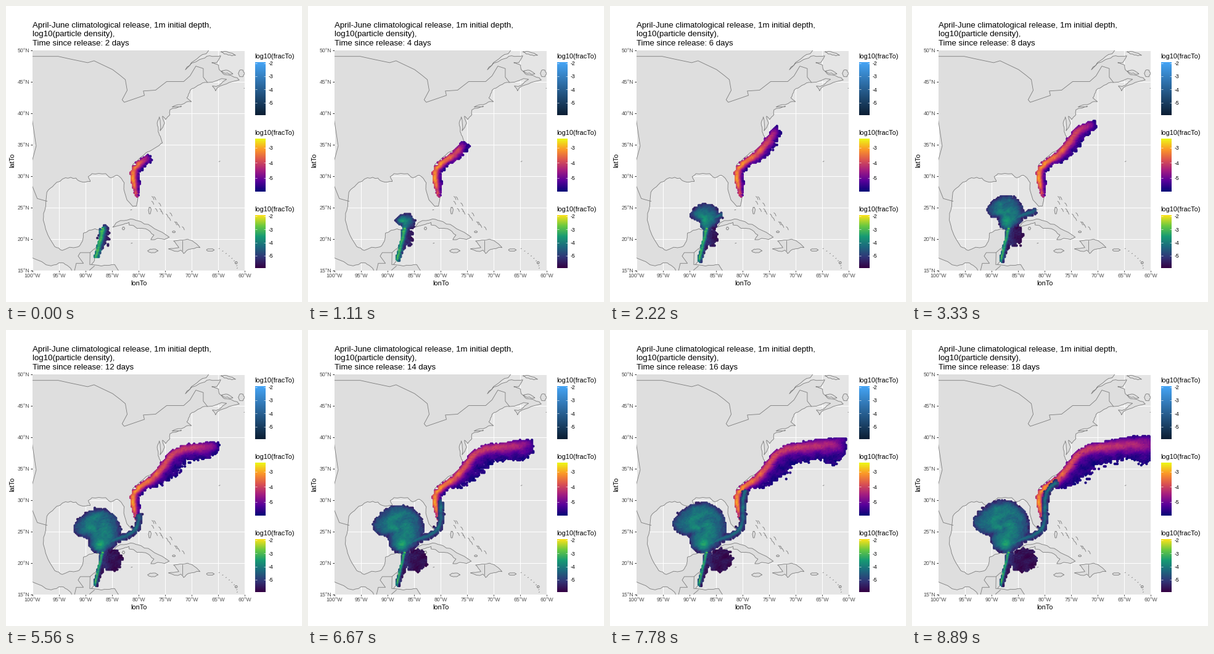
A matplotlib script for the animation above (10000 ms loop, 480 px wide and 480 px high).

```python
import numpy as np
import matplotlib.pyplot as plt
from matplotlib.animation import FuncAnimation
from matplotlib.colors import LinearSegmentedColormap, to_rgb
from matplotlib.patches import Rectangle

SIZE, DPI = 480, 96
PX = 72 / DPI
LOOP_MS, FRAMES = 10000, 100
DAYS = range(2, 19, 2)
LEFT, RIGHT, TOP, BOTTOM = 43, 387, 71.5, 428.5
COAST = "#7c7c7c"

rng = np.random.default_rng(7)
plt.rcParams["font.family"] = "Liberation Sans"
fig = plt.figure(figsize=(SIZE / DPI, SIZE / DPI), dpi=DPI, facecolor="white")
ax = fig.add_axes([0, 0, 1, 1])
ax.axis("off")
panel = Rectangle((LEFT, TOP), RIGHT - LEFT, BOTTOM - TOP, fc="#e5e5e5", lw=0, zorder=0)
ax.add_patch(panel)


def pts(*v):
    return np.array(v, float).reshape(-1, 2)


def project(west, lat):
    return LEFT + 8.6 * (100 - west), TOP + 10.2 * (50 - lat)


def line(x, y, color, width, z, clip=True):
    art, = ax.plot(x, y, color=color, lw=width * PX, zorder=z, solid_capstyle="butt")
    if clip:
        art.set_clip_path(panel)


def label(x, y, text, size, color="black", **kw):
    kw.setdefault("va", "baseline")
    return ax.text(x, y, text, fontsize=size * PX, color=color, **kw)


# --- base map, in degrees west and north ---
def roughen(p, amount=.07, rounds=2):
    """Midpoint displacement: gives a shore its small bays and capes."""
    for _ in range(rounds):
        step = np.roll(p, -1, axis=0) - p
        side = step[:, ::-1] * [1, -1]
        shift = np.clip(rng.normal(0, amount, (len(p), 1)), -.12, .12)
        mid = p + step / 2 + side * shift
        p = np.stack([p, mid], axis=1).reshape(-1, 2)
    return p


def land(p):
    shape, = ax.fill(*project(*roughen(p).T), fc="#dedede", ec=COAST, lw=.85 * PX, zorder=2)
    shape.set_clip_path(panel)


def oval(west, lat, dw, dl, tilt=0):
    a = np.linspace(0, 2 * np.pi, 7)[:-1]
    land(np.column_stack([west + dw * np.cos(a), lat + dl * np.sin(a) + tilt * dw * np.cos(a)]))


def border(*v):
    line(*project(*pts(*v).T), COAST, .85, 3)


canada = pts(
    102, 52, 58, 52, 58, 51, 60, 50.25, 66.4, 50.25, 67.3, 49.4, 69.5, 48.3, 71.2, 46.85,
    68.5, 48.5, 66.6, 49.1, 64.5, 49.1, 65.3, 48, 66.2, 48, 64.9, 47.6, 64.8, 46.9, 63.8, 46.1,
    61.4, 45.6, 61, 45.25, 63.5, 44.6, 65.5, 43.5, 66.1, 44.3, 63.4, 45.35, 67, 44.85)
atlantic_coast = pts(
    68.8, 44.4, 70.3, 43.6, 70.9, 42.4, 70, 41.8, 71.4, 41.5, 73.7, 40.95, 71.9, 41.05,
    74.1, 40.5, 74.1, 39.75, 74.9, 38.95, 75.5, 39.5, 75.1, 38.4, 75.95, 37.15, 76.1, 39.4,
    76.5, 38.4, 76.3, 37, 75.9, 36.3, 75.5, 35.25, 76.5, 34.65, 77.95, 33.9, 79.2, 33.2,
    81.1, 31.8, 81.4, 30.4, 80.55, 28.4, 80.03, 26.8, 80.4, 25.2, 81.1, 25.15)
gulf_coast = pts(
    82.7, 27.6, 82.7, 28.9, 84, 30.1, 85.3, 29.7, 86.2, 30.35, 88.8, 30.35, 89.5, 29.9,
    89.1, 29.1, 90.9, 29.1, 91.8, 29.65, 93.8, 29.7, 95.9, 28.6, 97.3, 27.4, 97.7, 24.5,
    97.8, 22.5, 97.1, 20.6, 95.8, 18.75, 94.4, 18.15, 91.5, 18.7, 90.6, 19.6, 90.4, 20.9,
    88.2, 21.6, 87, 21.55, 87.5, 19.5, 88.2, 18.4, 88.3, 16.6, 88.9, 15.9, 86.4, 15.8,
    84.5, 15.9, 83, 14, 92, 14, 93.2, 15.6, 94.5, 16.2, 96.5, 15.7, 100, 16.95, 102, 17.5)
land(np.vstack([canada, atlantic_coast, gulf_coast]))
land(pts(84.9, 21.85, 84, 22.65, 81.5, 23.15, 79.5, 22.7, 77, 21.6, 74.2, 20.25, 75.1, 19.9,
         77.7, 19.85, 77.1, 20.6, 78.7, 21.6, 81.8, 22.2, 81.8, 22.6, 83.3, 22.2))
land(pts(74.4, 18.4, 72.4, 18.6, 73.4, 19.65, 71.7, 19.8, 69.9, 19.7, 68.4, 18.6, 70.6, 18.3,
         71.5, 17.65, 72, 18.2))

oval(77.3, 18.1, 1, .3)
oval(66.45, 18.22, .75, .22)
oval(63.3, 46.45, 1.1, .25, .2)
oval(63.1, 49.45, 1.4, .25, .2)
oval(60.6, 46.3, .6, .6)
oval(77.9, 24.5, .25, .6)
oval(82.85, 21.65, .25, .25)
oval(73.35, 21.1, .3, .15)
oval(61.6, 16.2, .25, .2)
for t in np.linspace(0, 1, 14):  # Bahamas
    w, n = 77.9 - 5.9 * t + rng.normal(0, .4), 26.7 - 5 * t + rng.normal(0, .2)
    border(w + .25, n + .25, w, n + .1, w - .2, n - .3)
for t in np.linspace(0, 1, 9):  # Lesser Antilles
    w, n = 64.8 - 3.4 * np.sin(t * np.pi / 2), 18.4 - 3.1 * t
    border(w + .1, n, w - .1, n + .08)
for w, n in pts(64.75, 32.3, 60, 43.95, 81.3, 19.3, 81.4, 24.6):
    border(w + .15, n - .04, w - .15, n + .04)

border(102, 49, 95.15, 49, 93, 48.6, 89.6, 48, 88.4, 48.3, 84.9, 46.9, 83.5, 46, 82.5, 45.3,
       82.15, 43.6, 83.1, 42.1, 82.7, 41.7, 78.9, 42.8, 79.1, 43.5, 76.8, 43.63, 74.7, 45,
       71.5, 45, 70.3, 45.9, 69.2, 47.45, 67.8, 47.07, 67.8, 45.7, 67, 44.85)
border(101, 29.5, 100, 28.3, 99.1, 26.4, 97.2, 25.95)
border(92.2, 14.5, 91.75, 16.1, 90.4, 16.1, 91.4, 17.25, 91, 17.8, 89.15, 17.8, 88.3, 18.45)
border(89.15, 17.8, 89.2, 15.9, 88.9, 15.9)
border(88.3, 15.7, 89.2, 15.05, 89.3, 14.4)
border(71.75, 19.8, 71.75, 18.05)

for w in range(60, 101, 5):
    x, _ = project(w, 0)
    line([x, x], [TOP, BOTTOM], "white", 1.07, 1)
    line([x, x], [BOTTOM, BOTTOM + 2.75], "#333333", 1.07, 1, False)
    label(x, 439.5, f"{w}°W", 8.8, "#4d4d4d", ha="center")
for n in range(15, 51, 5):
    _, y = project(0, n)
    line([LEFT, RIGHT], [y, y], "white", 1.07, 1)
    line([LEFT - 2.75, LEFT], [y, y], "#333333", 1.07, 1, False)
    label(38, y + 3.2, f"{n}°N", 8.8, "#4d4d4d", ha="right")
label(215, 453, "lonTo", 11, ha="center")
label(10.5, 250, "latTo", 11, ha="center", va="center", rotation=90)
label(43, 35, "April-June climatological release, 1m initial depth,", 13.2)
label(43, 49.3, "log10(particle density),", 13.2)
clock = label(43, 63.6, "", 13.2)


# --- legends ---
def scale(*stops, gamma=1.2):
    colors = [tuple(np.array(to_rgb(c)) ** gamma) for c in stops]
    return LinearSegmentedColormap.from_list("scale", colors)


blues = scale("#132b43", "#56b1f7")
plasma = scale("#0d0887", "#6a00a8", "#b12a90", "#e16462", "#fca636", "#f0f921")
viridis = scale("#440154", "#414487", "#2a788e", "#22a884", "#7ad151", "#fde725")


def legend(top, colors, first, tick_y, step):
    label(403.5, top - 6.3, "log10(fracTo)", 11)
    ax.imshow(np.linspace(1, 0, 256)[:, None], cmap=colors, aspect="auto",
              extent=(404, 421, top + 86, top), zorder=2)
    for k in range(first, 6):
        y = tick_y + (k - first) * step
        for x in (404, 417.6):
            line([x, x + 3.4], [y, y], "white", .6, 3, False)
        label(426, y + 3.2, f"-{k}", 8.8)


legend(91, blues, 2, 93, 21.2)
legend(215, plasma, 3, 230, 24.3)
legend(339, viridis, 2, 341, 21.3)
ax.set(xlim=(0, SIZE), ylim=(SIZE, 0))

# --- plumes: dots on a fine grid, shaded by position along and across currents ---
X, Y = (g.ravel() for g in np.meshgrid(np.arange(88, 391, 2.15), np.arange(160, 422, 2.04)))


def ripple(wave, count=9):
    ang, phase = rng.uniform(0, 2 * np.pi, (2, count, 1))
    k = 2 * np.pi / (wave * rng.uniform(.7, 1.5, (count, 1)))
    return np.sin(k * (X * np.cos(ang) + Y * np.sin(ang)) + phase).sum(0) / np.sqrt(count)


RAGGED = .9 * ripple(9) + rng.normal(0, .5, X.size)
GRAIN = .025 * ripple(16) + rng.normal(0, .02, X.size)


def along(*v):
    """Distance travelled along a smoothed path and offset to its right."""
    p = pts(*v)
    s = np.r_[0, np.cumsum(np.hypot(*np.diff(p, axis=0).T))]
    u = np.arange(-9, s[-1] + 9, 1.5)
    kernel = np.ones(9) / 9
    x, y = (np.convolve(np.interp(u, s, c), kernel, "valid") for c in p.T)
    u = u[4:-4]
    keep = (u >= 0) & (u <= s[-1])
    u, x, y = u[keep], x[keep], y[keep]
    tx, ty = np.gradient(x), np.gradient(y)
    size = np.hypot(tx, ty)
    near = ((X[:, None] - x) ** 2 + (Y[:, None] - y) ** 2).argmin(1)
    dx, dy, tx, ty = X - x[near], Y - y[near], (tx / size)[near], (ty / size)[near]
    return u[near] + tx * dx + ty * dy, tx * dy - ty * dx


def inner(*limits):
    return np.minimum.reduce(np.broadcast_arrays(*limits))


def fade(e, reach):
    return 1 - np.exp(-np.maximum(e, 0) / reach)


def bell(v, width):
    return np.exp(-(v / width) ** 2)


stream_s, stream_n = along(214, 312, 209, 288, 208, 268, 220, 253, 240, 240, 254, 223, 268, 203,
                           288, 192, 312, 191, 340, 188, 370, 187, 402, 188)
tail_s, tail_n = along(144, 418, 149, 395, 154, 375, 158, 356)
strait_s, strait_n = along(160, 348, 180, 340, 198, 334, 210, 326, 216, 312, 216, 285, 217, 268,
                           226, 254, 242, 244)


def atlantic(day):
    s, n = stream_s, stream_n
    tip = 48 + 17.3 * day - .28 * day ** 2
    age = np.clip((tip - s) / 13, 0, None)
    left = np.minimum(7, 3 + .16 * s) + 1.4 * max(day - 11, -2) * np.clip((s - 140) / 100, 0, 1)
    spread = 2.6 * age * np.clip((s - 70) / 60, 0, 1)
    curl = 18 * np.clip((day - 10) / 6, 0, 1) * bell(s - tip + 22, 18)
    right = np.minimum(9.5, 3 + .25 * s) + spread + curl
    e = inner(s + 1, tip - s, left + n, right - n)
    e = e + RAGGED * (1 + .2 * np.where(n > 0, spread, 0))

    peak = .3 + .52 * np.exp(-np.clip(s - 30, 0, None) / 100) - .3 * np.clip(1 - s / 30, 0, 1)
    middle = -3 * np.clip((75 - s) / 30, 0, 1)
    core = peak * bell(n - middle, 6 + s / 40) * fade(tip - s, 12)
    return e, .03 + (core + .05) * fade(e, 2)


def gulf(day):
    # Loop current: a growing disc with a western point and a south-western dent.
    r0 = 50 * (1 - np.exp(-(day - 1) / 8))
    dx, dy = X - (165 - .4 * r0), Y - (368 - 1.12 * r0)
    r, a = np.hypot(dx, dy), np.arctan2(-dy, dx)
    rim = r0 * (1 + .16 * np.exp(12 * (np.cos(a - 3.03) - 1))
                - .4 * np.exp(9 * (np.cos(a + 2.5) - 1)))
    loop = rim - r + RAGGED
    swirl = .04 * np.sin(2 * a + r / 6)
    loop_u = .05 + (.42 + swirl) * fade(loop, 7)

    tail = inner(tail_s - 9 * np.exp(1 - day / 2), 62 - tail_s,
                 4 + tail_n, 4 + .12 * tail_s - tail_n) + RAGGED
    tail_u = .08 + .72 * bell(tail_n + .5, 2.5 + 4 * np.exp(-(day - 2) / 4)) * fade(tail, 2)

    strait = inner(strait_s, 10 * day - 35 - strait_s, 5.8 - abs(strait_n)) + RAGGED
    strait_u = .06 + .4 * bell(strait_n, 4.5) * fade(strait, 2)

    # Caribbean side: sparse and dark, drifting east.
    wide, tall = 7 + .85 * day, 16 + .2 * day
    lobe = wide * (1 - np.hypot((X - 155 - 1.4 * day) / wide, (Y - 373) / tall)) + 2 * RAGGED
    lobe_u = np.full(X.size, .06) + .1 * bell(X - 160, 8)

    parts = ((loop, loop_u), (tail, tail_u), (strait, strait_u), (lobe, lobe_u))
    e = np.max([p for p, _ in parts], axis=0)
    u = np.max([np.where(p > 0, q, 0) for p, q in parts], axis=0)
    return e, u + .2 * bell(np.hypot(X - 153, (Y - 352) * .8), 9) * fade(e, 3)


def dots(plume, colors, day):
    e, u = plume(day)
    keep = e > 1.4
    return np.column_stack([X, Y])[keep], colors(np.clip(u + GRAIN, .01, 1))[keep]


def cloud(z):
    art = ax.scatter([], [], s=(4.2 * PX) ** 2, linewidths=0, zorder=z)
    art.set_clip_path(panel)
    return art


layers = [(cloud(5), [dots(atlantic, plasma, d) for d in DAYS]),
          (cloud(6), [dots(gulf, viridis, d) for d in DAYS])]


def update(i):
    k = (len(DAYS) * i + 8) // FRAMES
    clock.set_text(f"Time since release: {DAYS[k]} days")
    for art, states in layers:
        spots, colors = states[k]
        art.set_offsets(spots)
        art.set_facecolors(colors)
    return [clock] + [art for art, _ in layers]


anim = FuncAnimation(fig, update, frames=FRAMES, interval=LOOP_MS // FRAMES,
                     repeat=True, repeat_delay=0, blit=False)
plt.show()
```
